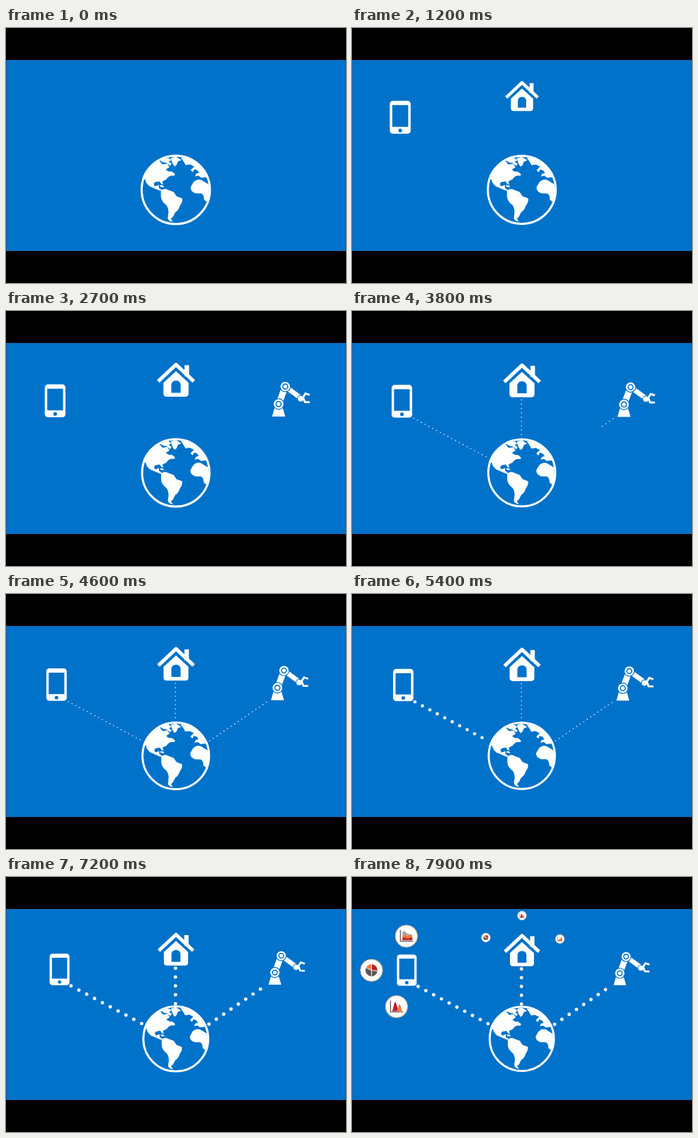
These frames come from a looping animation (480 px wide and 360 px high, 8 s). An HTML page with a canvas:

```html
<!DOCTYPE html>
<html lang="en">
<head>
<meta charset="utf-8">
<title>Connected world</title>
<style>
html, body { margin: 0; width: 100%; height: 100%; overflow: hidden; background: #000; }
canvas { display: block; width: 100vw; height: 100vh; }
</style>
</head>
<body>
<canvas id="stage" width="480" height="360"></canvas>
<script>
const ctx = document.getElementById('stage').getContext('2d');
const LOOP = 8000, BLUE = '#0072ca', WHITE = '#fff';
const RED = '#bd1f2b', ORANGE = '#f0793a', GRAY = '#5f5657';
const CX = 239.7, CY = 228.5;

const clamp = v => Math.max(0, Math.min(1, v));
const progress = (t, start, length) => clamp((t - start) / length);
const easeOut = p => 1 - (1 - p) ** 3;
const mix = (a, b, p) => a + (b - a) * p;

function disc(x, y, r, color) {
  ctx.fillStyle = color;
  ctx.beginPath();
  ctx.arc(x, y, r, 0, 7);
  ctx.fill();
}

function ring(x, y, r, width, color) {
  ctx.strokeStyle = color;
  ctx.lineWidth = width;
  ctx.beginPath();
  ctx.arc(x, y, r, 0, 7);
  ctx.stroke();
}

function box(x, y, w, h, r, color) {
  ctx.fillStyle = color;
  ctx.beginPath();
  ctx.roundRect(x, y, w, h, r);
  ctx.fill();
}

function fill(path, color) {
  ctx.fillStyle = color;
  ctx.fill(new Path2D(path));
}

function stroke(path, width, color) {
  ctx.strokeStyle = color;
  ctx.lineWidth = width;
  ctx.stroke(new Path2D(path));
}

// Draws a shape that grows around its own centre.
function pop(x, y, size, draw) {
  if (size <= 0) return;
  ctx.save();
  ctx.translate(x, y);
  ctx.scale(size, size);
  draw();
  ctx.restore();
}

// Coastlines, relative to a globe centred at 240,229.
const land = [
  'M192 215Q196 201 207 192L216 187L221 193L228 192L231 197L226 200Q229 204 234 203L237 205L239 207L238 209L233 209Q228 211 227 214L221 217L222 222L219 220L217 217L211 218Q207 221 211 224L216 222L216 226L221 230L217 230L210 227L203 224Q197 219 197 214Z',
  'M217 187L224 184L230 184L234 187L230 189L234 192L232 195L227 191L222 190Z',
  'M233 184L240 182L248 187L243 189L241 194L238 196L235 191Z',
  'M247 183Q263 184 275 195Q282 202 284 211L276 212L272 209L267 210L269 206L273 205L270 201L266 200L264 204L261 201L266 196L260 193L254 194L251 189Z',
  'M265 218Q270 213 276 215L281 218L286 221Q289 235 284 246L280 243Q280 236 276 234L268 234Q260 231 261 225Z',
  'M219 230Q224 226 229 229L237 232L241 238L249 241Q250 246 246 251Q244 258 239 261L236 267L233 270L236 274Q227 273 229 266Q231 257 227 251Q219 245 219 238Z',
  'M217 223Q221 221 224 225L219 225Z'
].join('');

function globe() {
  ctx.save();
  ctx.translate(-240, -229);
  fill(land, WHITE);
  ctx.restore();
  ring(0, 0, 48.2, 3, WHITE);
}

function phone() {
  box(-14.8, -23.5, 29.6, 47, 4.5, WHITE);
  box(-11.3, -17.3, 22.6, 31, 0, BLUE);
  disc(0, 18.8, 2.6, BLUE);
}

function house() {
  box(12.2, -20.7, 6.5, 16, 0, WHITE);
  fill('M0-12L18 4.5V20Q18 24.5 13.5 24.5H-13.5Q-18 24.5-18 20V4.5Z', WHITE);
  ctx.lineJoin = 'round';
  stroke('M-25.5 2.5L0-21.5L25.5 2.5', 5.2, WHITE);
  box(-6.7, 1.5, 13.4, 17.5, [6, 6, 0, 0], BLUE);
}

function joint(x, y, r) {
  disc(x, y, r + 1.2, BLUE);
  disc(x, y, r, WHITE);
  ring(x, y, r * .52, 1.6, BLUE);
}

function robot() {
  fill('M-23 10H-12L-8 23.5H-26.8Z', WHITE);
  stroke('M-17.5 6L-8-19.5', 9, WHITE);
  stroke('M-8-19.5L13-4', 7, WHITE);
  joint(-17.5, 5.5, 7);
  joint(-8, -19.5, 6.8);
  disc(14, -2.2, 5, BLUE);
  disc(14, -2.2, 4, WHITE);
  stroke('M27-7.5L21-9.5L17.5-4L20 2.5L27 3', 2.8, WHITE);
}

const charts = {
  area() {
    fill('M-6-1V-6L-3-8L1-4L5-3V0Z', '#aaa3a3');
    fill('M-6 4V0L-2-2L2 0L6-3L9-1V4Z', ORANGE);
    fill('M-6 6V3L-2 2L2 4L6 2L9 3V6Z', RED);
    stroke('M-9-9V7.5H10', 1.3, GRAY);
  },
  humps() {
    fill('M-7 7Q-5 4-4-3Q-2-10 0-3Q2 4 4 7Z', RED);
    fill('M0 7Q2 4 3-1Q4.500-6 6-1Q7 4 9 7Z', ORANGE);
    stroke('M-9-9V8H10', 1.3, GRAY);
  },
  bars() {
    for (let i = 0; i < 4; i++) box(-7 + i * 4, 3 - i * 3, 3, 4 + i * 3, 0, i % 2 ? RED : ORANGE);
    stroke('M-9-8V8H10', 1.3, GRAY);
  },
  pie() {
    [[-1.57, .1, RED], [.1, 3.6, GRAY], [3.6, 4.71, ORANGE]].forEach(([from, to, color]) => {
      ctx.fillStyle = color;
      ctx.beginPath();
      ctx.moveTo(0, 0);
      ctx.arc(0, 0, 9, from, to);
      ctx.fill();
    });
    stroke('M0-9V9M0 0L9 .9M0 0L-8-4', 1, WHITE);
  }
};

function badge(x, y, size, chart) {
  pop(x, y, size, () => {
    disc(0, 0, 16.8, WHITE);
    ring(0, 0, 16.6, .9, '#c9a36a');
    charts[chart]();
  });
}

// Dots run from a to b; they appear from the icon end, then swell.
function link(a, b, shown, thick, fromGlobe) {
  const length = Math.hypot(b[0] - a[0], b[1] - a[1]);
  const pitch = mix(6.2, 13.2, thick), radius = mix(.8, 2.6, thick);
  if (shown <= 0) return;
  for (let d = 0; d <= length + .5; d += pitch) {
    const p = d / length;
    if ((fromGlobe ? 1 - p : p) <= shown) disc(mix(a[0], b[0], p), mix(a[1], b[1], p), radius, WHITE);
  }
}

function render(t) {
  const sec = t / 1000;
  const zoom = 1 - .0048 * sec - 5.5e-6 * sec ** 4;
  const grow = (start, length = 400) => easeOut(progress(t, start, length));

  ctx.fillStyle = BLUE;
  ctx.fillRect(0, 0, 480, 360);
  ctx.save();
  ctx.translate(CX, CY);
  ctx.scale(zoom, zoom);

  globe();
  link([-155.6, -78.6], [-49, -21.8], progress(t, 2900, 400), progress(t, 4965, 500));
  link([-.5, -105], [-.5, -48], progress(t, 3300, 400), progress(t, 5600, 500));
  link([49.3, -21.8], [133.5, -79.2], progress(t, 3700, 450), progress(t, 6200, 500), true);

  pop(-172.6, -103.1, grow(400), phone);
  pop(.3, -133.4, grow(1000), house);
  pop(164.6, -104, grow(1600), robot);

  const first = grow(7300, 350), second = grow(7845, 350);
  badge(-173.2, -154.1, first, 'area');
  badge(-225.6, -102.9, first, 'pie');
  badge(-188, -48.4, first, 'humps');
  badge(.3, -185, second, 'humps');
  badge(-53.9, -152, second, 'pie');
  badge(57.2, -149.9, second, 'bars');
  ctx.restore();

  // Letterbox with a thin dim edge around the picture.
  ctx.fillStyle = '#000';
  ctx.fillRect(0, 0, 480, 45);
  ctx.fillRect(0, 315, 480, 45);
  ctx.strokeStyle = '#1d5f9c';
  ctx.lineWidth = 1;
  ctx.strokeRect(.5, 45.5, 479, 269);
}

const begin = performance.now();
function tick() {
  render((performance.now() - begin) % LOOP);
  requestAnimationFrame(tick);
}
tick();
</script>
</body>
</html>
```
